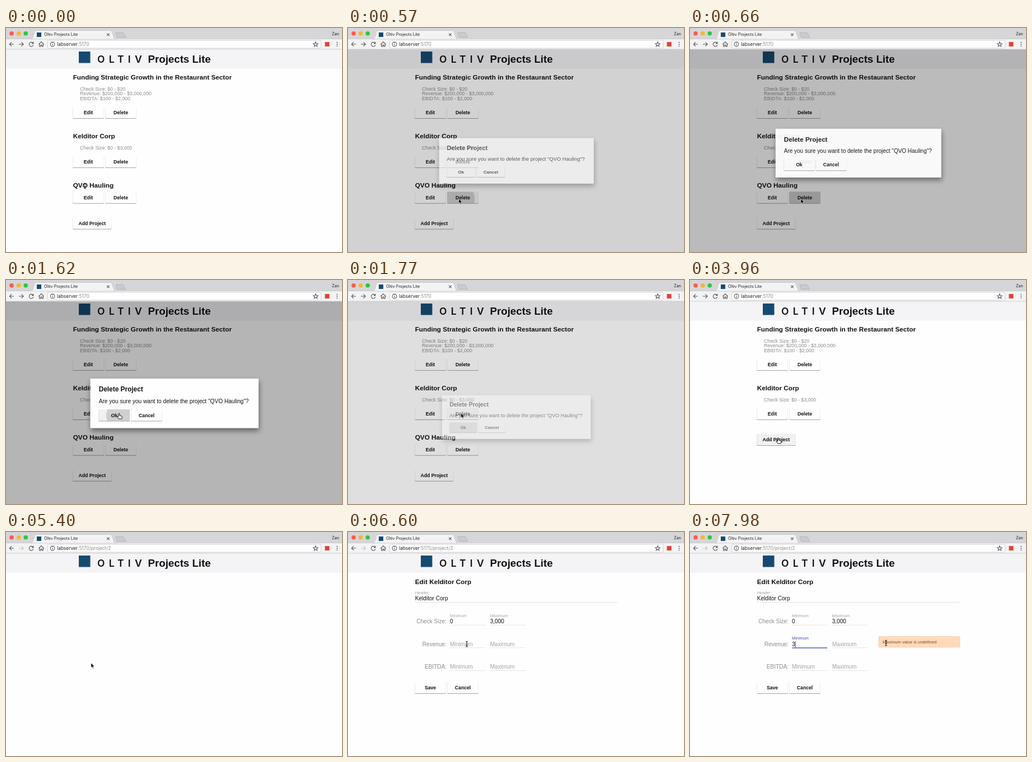
An HTML page that plays this animation: 600x400 px, repeating every 8 s.

```html
<!DOCTYPE html>
<html lang="en">
<head>
<meta charset="utf-8">
<title>Project list</title>
<style>
  html, body { margin: 0; width: 100%; height: 100%; overflow: hidden; background: #fefefe; }
  svg { display: block; }
  #page { font-family: "Liberation Sans", Arial, sans-serif; }
  #chrome { font-family: Inter, sans-serif; }
  .raised { filter: drop-shadow(0 1px .7px rgba(0, 0, 0, .36)); }
  .floating { filter: drop-shadow(1px 5px 5px rgba(0, 0, 0, .45)); }
  .icon { fill: none; stroke: #555558; stroke-width: 1.1; }
</style>
</head>
<body>
<svg width="600" height="400" viewBox="0 0 600 400">
  <g id="page"></g>
  <g id="chrome">
    <rect width="600" height="20" fill="#d6d5d8"/>
    <rect y="19.5" width="600" height="18.5" fill="#f3f3f4"/>
    <path d="M0 19.5H45M195 19.5H600M0 38H600" stroke="#c6c6c9" stroke-width=".8"/>
    <path d="M45 20Q47.5 19 48.5 15L51 6.5Q51.5 4.5 54 4.5H186Q188.5 4.5 189 6.5L192 15Q193 19 195.5 20Z" fill="#f3f3f4" stroke="#b9b9bc" stroke-width=".6"/>
    <path d="M196 8.5H208Q209.5 8.5 210.2 10L213.5 16.5H200Q198.5 16.5 197.8 15Z" fill="#cbcbce" stroke="#a9a9ac" stroke-width=".7"/>
    <circle cx="10" cy="9.7" r="3.8" fill="#fb5a50"/>
    <circle cx="22.7" cy="9.7" r="3.8" fill="#f7b62c"/>
    <circle cx="35.2" cy="9.7" r="3.8" fill="#2cc640"/>
    <rect x="55" y="8" width="8" height="8" fill="#174a70"/>
    <text x="68" y="14.3" font-size="7.3" fill="#222">Oltiv Projects Lite</text>
    <path class="icon" d="M180.3 9.7l4.4 4.4m0-4.4l-4.4 4.4"/>
    <text x="582" y="12.5" font-size="7.2" fill="#222">Zan</text>
    <rect x="74.5" y="22" width="488" height="14" rx="2" fill="#fefefe" stroke="#c8c8cb" stroke-width=".8"/>
    <path class="icon" d="M14 29H6.5M10 25.3L6.3 29L10 32.7"/>
    <path id="forward" class="icon" d="M23 29H31M27.5 25.3L31.2 29L27.5 32.7"/>
    <path class="icon" d="M48.3 27A3.8 3.8 0 1 0 48.8 30.2M48.9 24.8V27.6H46"/>
    <path class="icon" d="M58.3 29.2L63 24.8L67.7 29.2M59.7 28.5V33H62V30.2H64V33H66.3V28.5"/>
    <circle class="icon" cx="83" cy="29" r="3.9"/>
    <path class="icon" d="M83 28.3V31.3M83 26.3V27.3"/>
    <text x="91" y="32" font-size="8.4" fill="#222">labserver<tspan fill="#8b8b8b">:5170<tspan id="path"></tspan></tspan></text>
    <path class="icon" d="M553 24.8l1.2 2.9 3.1.2-2.4 2 .8 3-2.7-1.7-2.7 1.7.8-3-2.4-2 3.1-.2z"/>
    <rect x="569.5" y="25" width="8" height="8" fill="#dc4638"/>
    <g fill="#555558"><circle cx="591.3" cy="25.7" r=".9"/><circle cx="591.3" cy="29" r=".9"/><circle cx="591.3" cy="32.3" r=".9"/></g>
  </g>
  <g id="pointer"></g>
</svg>
<script>
const LOOP = 8000;
const DIALOG_OPEN = 480, DIALOG_CLOSE = 1700, REMOVED = 2000;
const ROUTE = 5250, FORM = 5500, FOCUS = 6700, TYPED = 7600;

const PAPER = '#fefefe', INK = '#111', MUTED = '#8c8c8c', PALE = '#a3a3a3', ACCENT = '#3f51b5';

const projects = [
  { title: 'Funding Strategic Growth in the Restaurant Sector',
    details: ['Check Size: $0 - $20', 'Revenue: $200,000 - $3,000,000', 'EBIDTA: $100 - $2,000'] },
  { title: 'Kelditor Corp', details: ['Check Size: $0 - $3,000'] },
  { title: 'QVO Hauling', details: [] },
];

// time, x, y of the pointer's hot spot
const route = [
  [0, 141, 282], [380, 198, 305], [900, 198, 305], [1400, 202, 238], [1750, 202, 238],
  [2400, 164, 259], [2900, 164, 259], [3600, 157.5, 282], [4300, 157.5, 282],
  [4850, 152, 234], [5900, 152, 234], [6500, 212, 200], [6800, 212, 200], [7300, 350, 198],
];
const clicks = [
  { at: 430, x: 198, y: 305, layer: 'list' },
  { at: 1500, x: 203, y: 242, layer: 'dialog' },
  { at: 5100, x: 152, y: 238, layer: 'list' },
];
const pointers = {
  arrow: '<path d="M0 0V8.3L1.9 6.5L3.2 9.5L4.5 8.9L3.2 6.1H5.8Z" fill="#000" stroke="#fff" stroke-width=".5"/>',
  hand: '<path d="M-1 1A1 1 0 0 1 1 1V4.2L4.2 5Q5.6 5.4 5.3 7L4.6 10H-.6L-4 5.8Q-3.6 4.6 -2.4 5.4L-1 6.4Z" fill="#fff" stroke="#000" stroke-width=".9"/>',
  text: '<path d="M-1.8 -4.8Q0 -4.8 0 -3.5Q0 -4.8 1.8 -4.8M0 -4V4.5M-1.8 5Q0 5 0 4Q0 5 1.8 5M-1 1.5H1" fill="none" stroke="#000" stroke-width=".9"/>',
};

const byId = id => document.getElementById(id);
const clamp = v => Math.max(0, Math.min(1, v));
const mix = (a, b, p) => a + (b - a) * p;
const easeOut = p => 1 - (1 - p) ** 2;
const progress = (start, duration) => clamp((now - start) / duration);

let now, pointer, pointerKind;

function pointerAt(t) {
  const i = route.findIndex(stop => stop[0] > t);
  if (i < 0) return { x: route.at(-1)[1], y: route.at(-1)[2] };
  const [a, b] = [route[i - 1], route[i]];
  const p = (t - a[0]) / (b[0] - a[0]), s = p * p * (3 - 2 * p);
  return { x: mix(a[1], b[1], s), y: mix(a[2], b[2], s) };
}

const inside = (p, x, y, w, h) => p.x >= x && p.x <= x + w && p.y >= y && p.y <= y + h;

function hoverText(x, y, w, h) {
  if (inside(pointer, x, y, w, h)) pointerKind = 'text';
}

const text = (x, y, string, size, color = INK, extra = '') =>
  `<text x="${x}" y="${y}" font-size="${size}" fill="${color}" ${extra}>${string}</text>`;
const bold = (x, y, string, size, extra = '') => text(x, y, string, size, INK, 'font-weight="700" ' + extra);
const rect = (x, y, w, h, fill, extra = '') =>
  `<rect x="${x}" y="${y}" width="${w}" height="${h}" fill="${fill}" ${extra}/>`;

function button(x, cy, label, layer, live = true, w = 55.5) {
  const y = cy - 10.5, h = 20.5;
  const hovered = live && inside(pointer, x, y, w, h);
  if (hovered) pointerKind = 'hand';
  const ripples = clicks.filter(c => c.layer === layer && inside(c, x, y, w, h) && now >= c.at).map(c =>
    `<circle cx="${c.x - x}" cy="${c.y - y}" r="${Math.min(70, (now - c.at) * .2)}" fill="#000" opacity="${.14 * (1 - progress(c.at + 350, 350))}"/>`);
  return rect(x, y, w, h, hovered ? '#f1f1f1' : PAPER, 'rx="1.2" class="raised"') +
    `<svg x="${x}" y="${y}" width="${w}" height="${h}">${ripples.join('')}</svg>` +
    bold(x + w / 2, cy + 3, label, 8.7, 'text-anchor="middle"');
}

function header() {
  return rect(0, 38, 600, 34.5, '#f4f4f7') +
    rect(130, 42, 20.5, 20.5, '#174a70') +
    text(163, 61.7, 'OLTIV', 17.5, INK, 'font-family="Inter, sans-serif" font-weight="600" letter-spacing="7.2"') +
    bold(253.5, 61.8, 'Projects Lite', 18.7);
}

function list(live) {
  let y = 91.5, out = '';
  for (const { title, details } of projects.slice(0, now < REMOVED ? 3 : 2)) {
    const n = details.length, cy = y + (n ? 33.3 + 8.7 * n : 17.5);
    if (live) hoverText(120, y - 10, title.length * 6.5, 13);
    out += bold(119.7, y, title, 11.75);
    details.forEach((line, i) => out += text(132, y + 20 + 8.7 * i, line, 8.75, MUTED));
    out += button(119.3, cy, 'Edit', 'list', live) + button(177.3, cy, 'Delete', 'list', live);
    y = cy + 46.2;
  }
  return out + button(119.3, y - .2, 'Add Project', 'list', live, 69);
}

function dialog(p) {
  const scale = mix(.8, 1, p);
  return rect(0, 38, 600, 362, '#000', `opacity="${.29 * p}"`) +
    `<g opacity="${p}" transform="translate(300.5 ${220 + 42 * (1 - p)}) scale(${scale}) translate(-300.5 -220)">` +
    rect(150.5, 176, 300.5, 88.5, PAPER, 'class="floating"') +
    bold(165.7, 199, 'Delete Project', 11.85) +
    text(165.7, 220.3, 'Are you sure you want to delete the project "QVO Hauling"?', 10.15) +
    button(165.5, 241.5, 'Ok', 'dialog', p === 1) + button(223.3, 241.5, 'Cancel', 'dialog', p === 1) + '</g>';
}

function field(x, y, label, value, w = 63, float = value ? 1 : 0, color = PALE) {
  hoverText(x, y - 10, w, 13);
  return text(x, mix(y, y - 11.5, float), label, mix(10.1, 7.4, float), float ? color : PALE) +
    text(x, y, value, 10.1) + rect(x, y + 2.8, w, .8, '#dedede');
}

function form() {
  const focus = easeOut(progress(FOCUS, 200)), typed = now >= TYPED;
  const rows = [['Check Size:', '0', '3,000'], ['Revenue:', typed ? '3' : '', ''], ['EBITDA:', '', '']];
  let out = bold(119.7, 93.3, 'Edit Kelditor Corp', 11.75) + field(119.7, 122.4, 'Header', 'Kelditor Corp', 361.5);
  rows.forEach(([name, min, max], i) => {
    const y = 163 + 40.6 * i, focused = i === 1;
    out += text(176, y, name, 10.1, MUTED, 'text-anchor="end"') +
      field(182, y, 'Minimum', min, 63, focused ? focus : +!!min, focused ? ACCENT : PALE) +
      field(253.7, y, 'Maximum', max);
  });
  if (focus) {
    out += rect(213.5 - 31.5 * focus, 206.3, 63 * focus, 1.3, ACCENT);
    const since = now - (typed ? TYPED : FOCUS);
    if (since % 1000 < 500) out += rect(typed ? 187.8 : 182, 195.3, .8, 10.5, INK);
  }
  if (typed) {
    hoverText(337, 186, 145, 20);
    out += rect(337, 186.5, 145, 19.5, '#ffdab9', 'rx="1.5" stroke="#f3c7a0" stroke-width=".6"') +
      text(344, 198.7, 'Maximum value is undefined', 7.6, '#7d4636');
  }
  return out + button(119.3, 278, 'Save', 'form') + button(177.3, 278, 'Cancel', 'form');
}

function render(t) {
  now = t;
  pointer = pointerAt(t);
  pointerKind = 'arrow';
  const shown = easeOut(progress(DIALOG_OPEN, 250)) * (1 - easeOut(progress(DIALOG_CLOSE, 200)));
  let page = rect(0, 38, 600, 362, PAPER) + header();
  if (t < ROUTE) page += list(shown < 1);
  else if (t >= FORM) page += form();
  if (shown) {
    pointerKind = 'arrow';
    page += dialog(shown);
  }
  byId('page').innerHTML = page;
  byId('path').textContent = t < ROUTE ? '' : '/project/2';
  byId('forward').style.opacity = t < ROUTE ? 1 : .3;
  byId('pointer').innerHTML = `<g transform="translate(${pointer.x} ${pointer.y})">${pointers[pointerKind]}</g>`;
}

function tick() {
  render(performance.now() % LOOP);
  requestAnimationFrame(tick);
}
tick();
</script>
</body>
</html>
```
